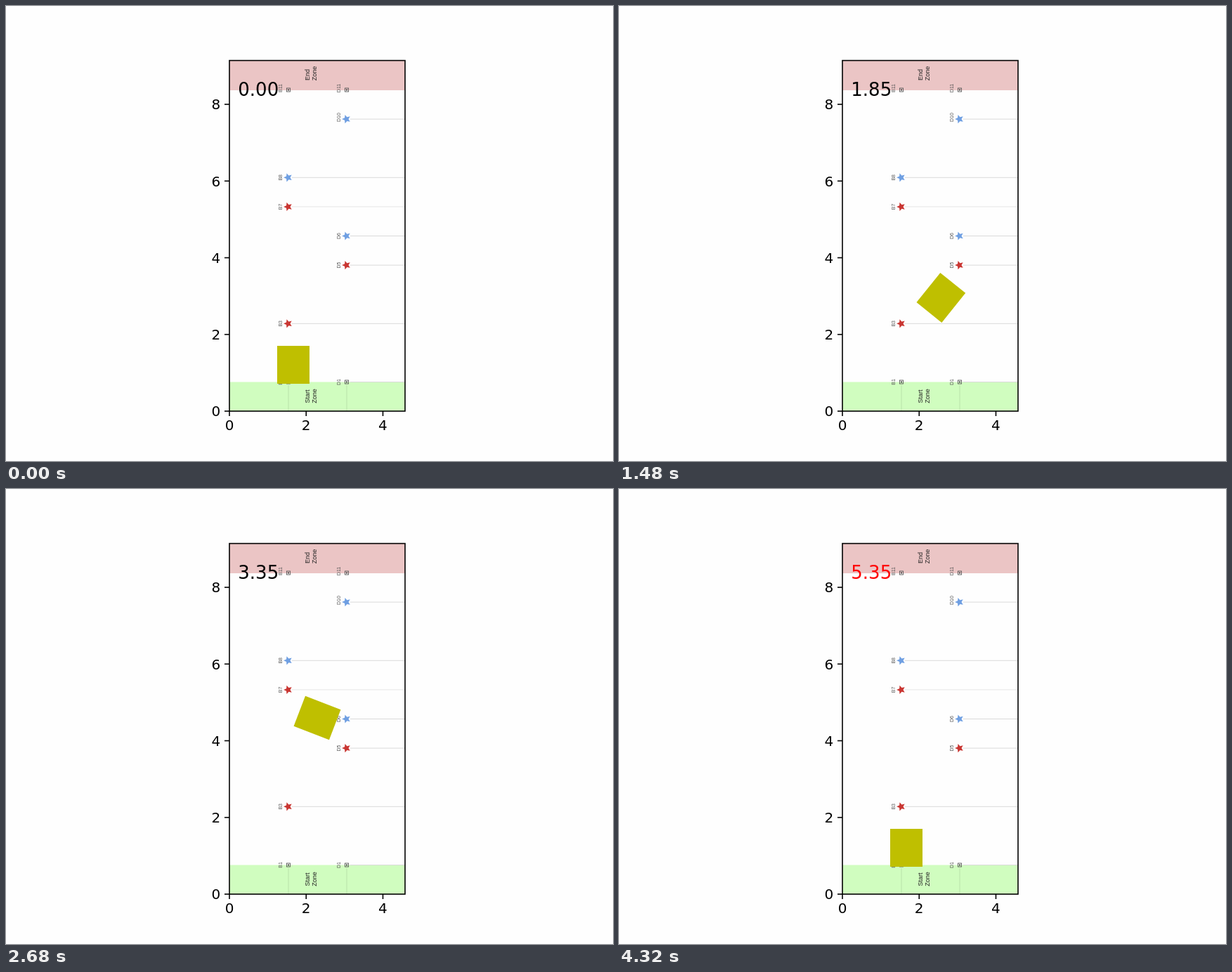
An HTML page that plays this animation: 864 by 648 pixels, repeating every 8 s.

```html
<!DOCTYPE html>
<html lang="en">
<head>
<meta charset="utf-8">
<title>Field path</title>
<style>
  html, body { margin: 0; width: 100%; height: 100%; overflow: hidden; background: #fefefe; }
  svg { display: block; }
  .axis { font: 20px "DejaVu Sans", sans-serif; }
  .zone { font: 9px "Liberation Sans", Arial, sans-serif; fill: #222; text-anchor: middle; }
  .spot { font: 7px "Liberation Sans", Arial, sans-serif; fill: #555; text-anchor: middle; }
  #clock { font: 26px "DejaVu Sans", sans-serif; }
</style>
</head>
<body>
<svg width="864" height="648" viewBox="0 0 864 648">
  <rect x="318" y="78" width="250" height="42" fill="#ebc5c5"/>
  <rect x="318" y="535.5" width="250" height="41.5" fill="#d0fdbf"/>
  <path d="M402 540V577M485 540V577" stroke="#b9e2a9"/>
  <g id="field"></g>
  <rect id="robot" x="-23" y="-27" width="46" height="54" fill="#bfbf00"/>
  <rect x="318" y="77.6" width="250" height="499.4" fill="none" stroke="#000" stroke-width="1.6"/>
  <g id="ticks" stroke-width="1.6"></g>
  <text id="clock" x="330.3" y="128"></text>
</svg>
<script>
const FRAME = 40, LOOP = 8000, LAST = 108;
const UNIT = 54.62, LEFT = 318, BOTTOM = 577;
const columns = { B: 402, D: 485 };
const RED = '#c93632', BLUE = '#6f9fe2';
const byId = id => document.getElementById(id);

const field = byId('field'), ticks = byId('ticks');
const add = (parent, markup) => parent.insertAdjacentHTML('beforeend', markup);
const upright = (kind, text, x, y) =>
  add(field, `<text class="${kind}" transform="translate(${x} ${y}) rotate(-90)">${text}</text>`);

function star(x, y, color) {
  const points = Array.from({ length: 10 }, (_, i) => {
    const r = i % 2 ? 3 : 6.4, a = Math.PI * (1 + i / 5);
    return `${x + r * Math.cos(a)},${y + r * Math.sin(a)}`;
  });
  add(field, `<polygon points="${points.join(' ')}" fill="${color}"/>`);
}

function marker(x, y) {
  add(field, `<rect x="${x - 2.5}" y="${y - 2.5}" width="5" height="5" fill="none" stroke="#555" stroke-width=".9"/>
    <rect x="${x - 1}" y="${y - 1}" width="2" height="2" fill="#444"/>`);
}

function spot(column, row, color) {
  const x = columns[column], y = 577.1 - 41.6 * row;
  if (color || column + row === 'D1')
    add(field, `<path d="M${x + 5} ${y}H568" stroke="${row === 7 ? '#e6e6e6' : '#dadada'}"/>`);
  if (color) star(x - 0.5, y, color);
  else marker(x, y);
  upright('spot', column + row, x - 9.5, row > 9 ? y - 2.5 : y);
}

[['B', 1], ['D', 1], ['B', 11], ['D', 11],
 ['B', 3, RED], ['D', 5, RED], ['B', 7, RED],
 ['D', 6, BLUE], ['B', 8, BLUE], ['D', 10, BLUE]].forEach(s => spot(...s));
upright('zone', 'End', 432, 98);
upright('zone', 'Zone', 441.5, 96);
upright('zone', 'Start', 432, 556);
upright('zone', 'Zone', 441.5, 555.5);

for (let v = 0; v <= 8; v += 2) {
  const x = LEFT + v * UNIT, y = BOTTOM - v * UNIT;
  add(ticks, `<path d="M318 ${y}h-7" stroke="#000"/>
    <text class="axis" x="305.2" y="${y + 7.3}" text-anchor="end">${v}</text>`);
  if (v < 5) add(ticks, `<path d="M${x} 577v7" stroke="#000"/>
    <text class="axis" x="${x}" y="604.3" text-anchor="middle">${v}</text>`);
}

// step, x, y, heading in degrees clockwise from up, pixels per step
const route = [
  [0, 409, 511, 0, 0],
  [21, 413.4, 459.6, 26, 2.9],
  [27, 425.2, 446.6, 54.4, 3.1],
  [42, 471, 397, 30, 3.7],
  [48, 477.5, 375, 0.7, 3.4],
  [63, 459.5, 333.5, -64, 4.2],
  [67, 443, 326, -69, 4.2],
  [83, 409.5, 291, -3.7, 3.6],
  [93, 409, 226, 0, 8.4],
  [107, 409, 154, 0, 0]
];

const hermite = (a, b, va, vb, s) =>
  a + s * (va + s * (3 * (b - a) - 2 * va - vb + s * (2 * (a - b) + va + vb)));
const slope = (a, b, va, vb, s) =>
  va + s * (2 * (3 * (b - a) - 2 * va - vb) + 3 * s * (2 * (a - b) + va + vb));

function pose(step) {
  let i = 0;
  while (i < route.length - 2 && step >= route[i + 1][0]) i++;
  const [t0, x0, y0, h0, v0] = route[i], [t1, x1, y1, h1, v1] = route[i + 1];
  const span = t1 - t0, length = Math.hypot(x1 - x0, y1 - y0), rad = Math.PI / 180;
  const s = hermite(0, 1, v0 * span / length, v1 * span / length, (step - t0) / span);
  const xs = [x0, x1, length * Math.sin(h0 * rad), length * Math.sin(h1 * rad), s];
  const ys = [y0, y1, -length * Math.cos(h0 * rad), -length * Math.cos(h1 * rad), s];
  return [hermite(...xs), hermite(...ys), Math.atan2(slope(...xs), -slope(...ys)) / rad];
}

const robot = byId('robot'), clock = byId('clock');
function draw(now) {
  const step = Math.min(LAST, Math.floor(now % LOOP / FRAME)), done = step === LAST;
  const [x, y, angle] = pose(done ? 0 : step);
  robot.setAttribute('transform', `translate(${x} ${y}) rotate(${angle})`);
  clock.textContent = (Math.min(step, LAST - 1) / 20).toFixed(2);
  clock.setAttribute('fill', done ? '#f00' : '#000');
}

let start;
function tick(now) {
  start ??= now;
  draw(now - start);
  requestAnimationFrame(tick);
}
draw(0);
requestAnimationFrame(tick);
</script>
</body>
</html>
```
